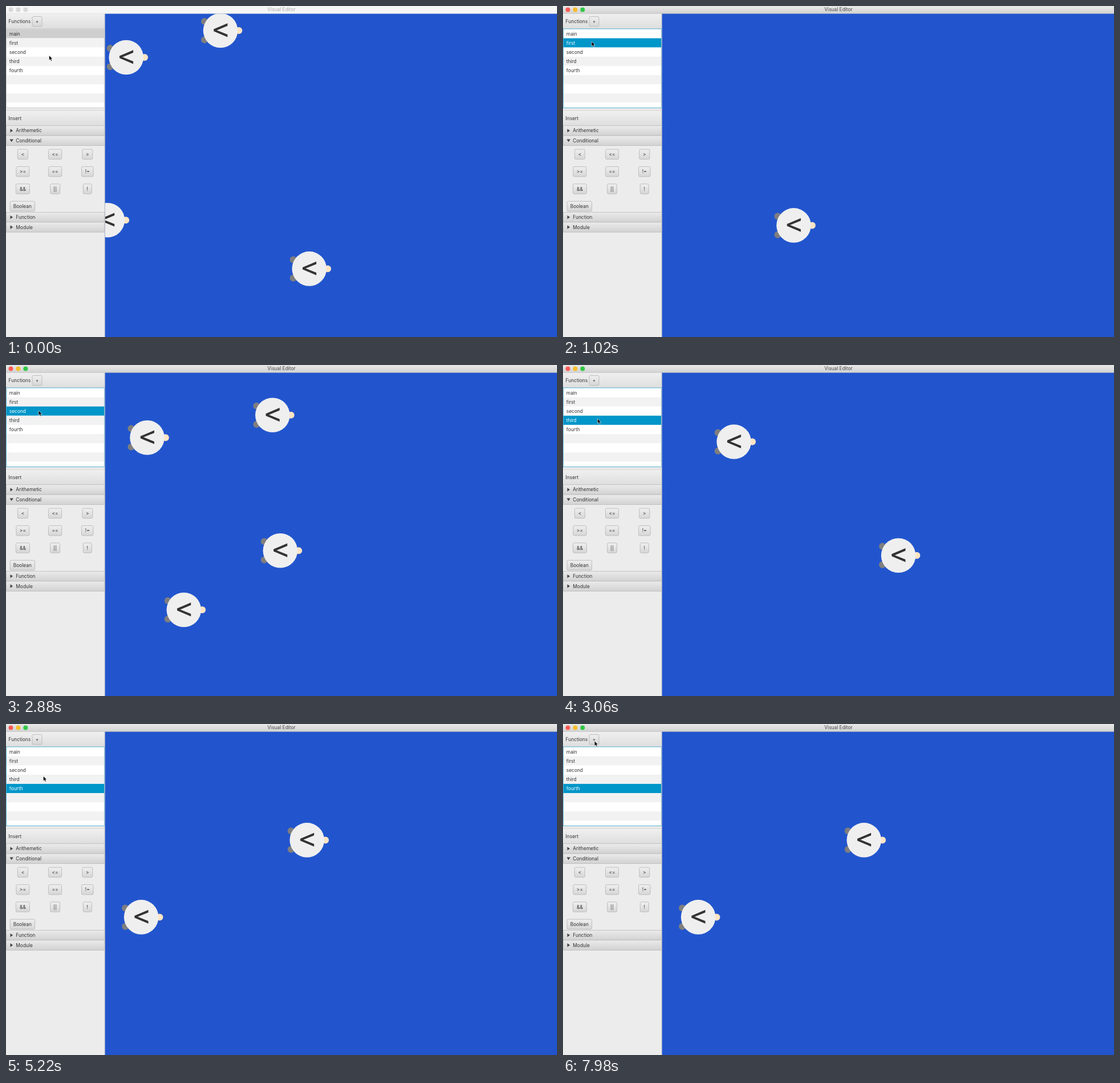
An HTML page that plays this animation: 966x580 px, repeating every 8000 ms.

```html
<!DOCTYPE html>
<html lang="en">
<head>
<meta charset="utf-8">
<title>Visual Editor</title>
<style>
  html, body { margin: 0; width: 100%; height: 100%; overflow: hidden; background: #2255cd; }
  svg { display: block; }
  text { font: 8.4px Inter, Roboto, sans-serif; fill: #333; }
  .mid { text-anchor: middle; }
</style>
</head>
<body>
<svg id="stage" width="966" height="580" viewBox="0 0 966 580">
  <defs>
    <linearGradient id="bar" x2="0" y2="1"><stop stop-color="#f0f0f0"/><stop offset="1" stop-color="#dedede"/></linearGradient>
    <linearGradient id="pane" x2="0" y2="1"><stop stop-color="#ebebeb"/><stop offset="1" stop-color="#d2d2d2"/></linearGradient>
    <linearGradient id="button" x2="0" y2="1"><stop stop-color="#efefef"/><stop offset="1" stop-color="#d6d6d6"/></linearGradient>
    <linearGradient id="active" x2="0" y2="1"><stop stop-color="#e8e8e8"/><stop offset="1" stop-color="#d3d3d3"/></linearGradient>
    <clipPath id="canvas"><path d="M173.5 13.5H966V580H173.5z"/></clipPath>
    <g id="node">
      <g fill="#7e7e80"><circle cx="-28" cy="-16" r="6"/><circle cx="-28" cy="16.3" r="6"/></g>
      <circle cx="32.3" r="6" fill="#ffe4c4"/>
      <circle r="30.3" fill="#efefef"/>
      <path d="M12.4-12.7V-8.2L-6.3-.6 12.4 6.9V11.4L-11.8 1.2V-2.5z" fill="#333"/>
    </g>
  </defs>
  <path fill="#2255cd" d="M0 0H966V580H0z"/>
  <g id="nodes" clip-path="url(#canvas)"></g>
  <g id="sidebar"></g>
  <g id="titlebar"></g>
  <path id="cursor" d="M0 0V8.6L2 6.8 3.5 10 5 9.3 3.6 6.2H6.2z" fill="#000" stroke="#fff" stroke-width=".6"/>
</svg>
<script>
const LOOP = 8000, ROW = 16.13, LIST_TOP = 40.4;
const names = ['main', 'first', 'second', 'third', 'fourth'];
const switches = [0, 1020, 1980, 3060, 4080];
const layouts = [
  [[210.7, 90], [376, 43], [177.8, 375.2], [531.7, 460.4]],
  [[404.5, 384.4]],
  [[247.5, 127.2], [467.3, 87.8], [480.8, 325.3], [311.8, 429]],
  [[299.7, 134.5], [588, 333.8]],
  [[527.7, 203.4], [237.1, 338.4]]
];
// Pointer legs: start, end, destination
const legs = [
  [60, 840, 50, 62], [1740, 1950, 57, 79.7], [2880, 3040, 60.5, 94],
  [3720, 3900, 67.3, 114], [4560, 6180, 62, 51.5], [6240, 7020, 55.2, 29.8]
];
const $ = id => document.getElementById(id);
const esc = s => s.replace(/&/g, '&amp;').replace(/</g, '&lt;');
const rect = (x, y, w, h, fill, more = '') =>
  `<rect x="${x}" y="${y}" width="${w}" height="${h}" fill="${fill}" ${more}/>`;
const label = (x, y, s, more = '') => `<text x="${x}" y="${y + 3}" ${more}>${esc(s)}</text>`;
const line = (y, color) => rect(0, y, 173, 1, color);

function button(x, y, w, s) {
  return rect(x - w / 2, y - 8.7, w, 17.4, 'url(#button)', 'rx="2" stroke="#b9b9b9" stroke-width=".9"') +
    label(x, y, s, 'class="mid"');
}

function pane(y, s, open) {
  const arrow = open ? 'M6.5 6.5h6.4l-3.2 4.6z' : 'M7.5 5.5v6.4l4.6-3.2z';
  return rect(.4, y, 172.6, 17.4, 'url(#pane)', 'stroke="#b8b8b8" stroke-width=".8"') +
    `<path transform="translate(0 ${y})" d="${arrow}" fill="#444"/>` + label(17.3, y + 8.7, s);
}

function list(selected) {
  const focused = selected > 0;
  let out = rect(0, 40, 173, 139, '#fff');
  for (let i = 0; i < 9; i++) {
    const y = LIST_TOP + i * ROW, picked = i === selected;
    const fill = picked ? (focused ? '#0096c9' : '#cecece') : i % 2 ? '#f2f2f2' : '#fff';
    out += rect(.5, y, 172, Math.min(ROW, 178.5 - y), fill);
    if (names[i]) out += label(5.8, y + 8.1, names[i], picked && focused ? 'style="fill:#fff"' : '');
  }
  return out + rect(.4, 40, 172.3, 138.5, 'none', `stroke="${focused ? '#45a9cc' : '#c4c4c4'}" stroke-width=".9"`);
}

function sidebar(selected) {
  const ops = [['<', 18], ['<=', 23], ['>', 18], ['>=', 23], ['==', 23], ['!=', 20.5], ['&&', 24], ['||', 17], ['!', 15]];
  return rect(0, 13, 173.4, 567, '#ececec') + rect(0, 13, 173, 27, 'url(#bar)') +
    label(4.6, 27.3, 'Functions') + button(54.5, 27.2, 17, '+') + list(selected) +
    rect(0, 179, 173, 4, '#ececec') + line(182.6, '#c4c4c4') +
    rect(0, 183.5, 173, 26, 'url(#bar)') + label(4.6, 197, 'Insert') +
    pane(209.7, 'Arithemetic') + pane(227.1, 'Conditional', true) +
    ops.map(([s, w], i) => button(29.4 + i % 3 * 56.7, 259.9 + Math.floor(i / 3) * 30.3, w, s)).join('') +
    button(28.8, 350.9, 43.5, 'Boolean') +
    pane(361.4, 'Function') + pane(378.8, 'Module') + rect(172.6, 13, .8, 567, '#c0c0c0');
}

function titlebar(active) {
  const lights = active ? ['#fc5b57', '#f5bd2e', '#33c748'] : Array(3).fill('#d9d9d9');
  return rect(0, 0, 966, 13.4, active ? 'url(#active)' : '#f6f6f6') +
    rect(0, 12.8, 966, .6, active ? '#b6b6b6' : '#d4d4d4') +
    lights.map((c, i) => `<circle cx="${8.5 + i * 12.9}" cy="6.4" r="4" fill="${c}"/>`).join('') +
    label(483, 6.4, 'Visual Editor', `class="mid" style="fill:${active ? '#444' : '#aaa'}"`);
}

function pointer(t) {
  let x = 75.5, y = 86.5;
  for (const [start, end, toX, toY] of legs) {
    const p = Math.min(1, Math.max(0, (t - start) / (end - start)));
    const ease = p * p * (3 - 2 * p);
    x += (toX - x) * ease;
    y += (toY - y) * ease;
  }
  return `translate(${x} ${y})`;
}

let shown = -1;
function draw(now) {
  const t = now % LOOP;
  const selected = switches.filter(s => s <= t).length - 1;
  if (selected !== shown) {
    shown = selected;
    $('nodes').innerHTML = layouts[selected].map(([x, y]) => `<use href="#node" x="${x}" y="${y}"/>`).join('');
    $('sidebar').innerHTML = sidebar(selected);
    $('titlebar').innerHTML = titlebar(selected > 0);
  }
  $('cursor').setAttribute('transform', pointer(t));
}

const begin = performance.now();
function tick() {
  draw(performance.now() - begin);
  requestAnimationFrame(tick);
}
tick();
</script>
</body>
</html>
```
